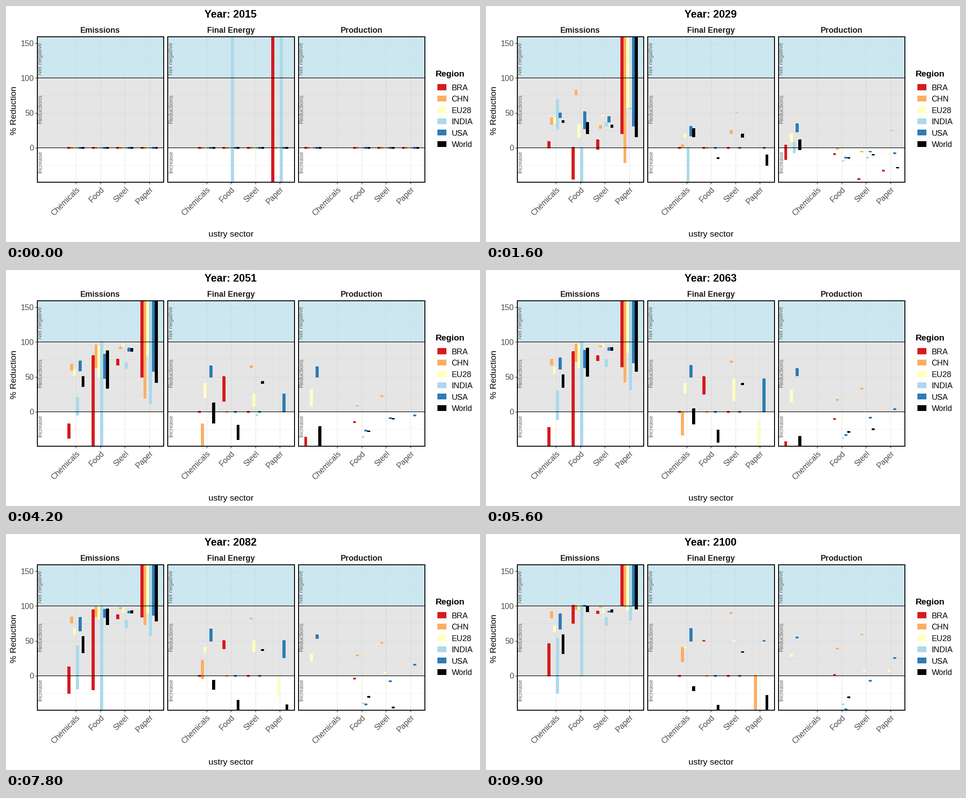
Animation of 1058x529 px, one loop 10000 ms. Source, as a matplotlib script:

```python
import numpy as np
import matplotlib.pyplot as plt
from matplotlib.animation import FuncAnimation
from matplotlib.patches import Rectangle

W, H, DPI = 1058, 529, 64
PT = 72 / DPI                       # points per pixel
FRAMES, INTERVAL = 100, 100
LEAD = 16                           # frames of the straight run from the start
BEND = 0.6                          # below 1: fast change first, slow later

TOP, BOTTOM = 69, 394.5
PANEL_W, PANEL_STEP, PANEL_X = 282.4, 291.6, 69.5
SLOT, DODGE = 54.5, 6.36
CAP, EDGE = 3.8, 0.2

PANELS = ["Emissions", "Final Energy", "Production"]
SECTORS = ["Chemicals", "Food", "Steel", "Paper"]
COLORS = {"BRA": "#D7191C", "CHN": "#FDAE61", "EU28": "#FFFFBF",
          "INDIA": "#ABD9E9", "USA": "#2C7BB6", "World": "#000000"}

plt.rcParams["font.family"] = "Liberation Sans"
fig = plt.figure(figsize=(W / DPI, H / DPI), dpi=DPI, facecolor="white")
ax = fig.add_axes([0, 0, 1, 1])
ax.set_xlim(0, W)
ax.set_ylim(H, 0)
ax.axis("off")


def y_of(value):
    return 317.8 - 1.565 * value


def panel_x(panel):
    return PANEL_X + PANEL_STEP * PANELS.index(panel)


def slot_x(panel, slot):
    return panel_x(panel) + 86.6 + SLOT * slot


def line(x0, y0, x1, y1, width, color, z, **style):
    ax.plot([x0, x1], [y0, y1], color=color, lw=width * PT, zorder=z,
            solid_capstyle="butt", **style)


def rect(x, y, w, h, z, **style):
    return ax.add_patch(Rectangle((x, y), w, h, zorder=z, **style))


def label(x, y, text, size, color="black", **style):
    style = {"ha": "center", "va": "baseline", "rotation_mode": "anchor", **style}
    return ax.text(x, y, text, fontsize=size * PT, color=color, zorder=9, **style)


def draw_panel(panel):
    x = panel_x(panel)
    right = x + PANEL_W
    for v in (-25, 25, 75, 125):
        line(x, y_of(v), right, y_of(v), 0.8, "#EBEBEB", 1)
    for v in (50, 150):
        line(x, y_of(v), right, y_of(v), 1.4, "#EBEBEB", 1)
    for i, sector in enumerate(SECTORS):
        sx = slot_x(panel, i)
        line(sx, TOP, sx, BOTTOM, 1.4, "#EBEBEB", 1)
        line(sx, BOTTOM, sx, BOTTOM + 4.5, 1.4, "#333333", 1)
        label(sx + 9.3, 412, sector, 17.7, "#4D4D4D", ha="right", rotation=45)
    rect(x, TOP, PANEL_W, y_of(100) - TOP, 2, fc="#ADD8E6", alpha=0.6, lw=0)
    rect(x, y_of(100), PANEL_W, y_of(0) - y_of(100), 2, fc="#CCCCCC", alpha=0.5, lw=0)
    for v in (0, 100):
        line(x, y_of(v), right, y_of(v), 1.3, "black", 6, snap=False)
    for y, text in ((118.5, "Net negative"), (230, "Reductions"), (348.5, "Increase")):
        label(x + 10.5, y, text, 13, "#666666", rotation=90)
    rect(x, TOP, PANEL_W, BOTTOM - TOP, 7, fc="none", ec="black", lw=2 * PT)
    label(x + PANEL_W / 2 - 0.5, 60, panel, 17.7, "#1A1A1A", weight="bold")


def path(frame, points, start=0):
    """Run from start to the first point, then ease through the others."""
    points = np.atleast_1d(points)
    if frame < LEAD:
        return start + (points[0] - start) * frame / LEAD
    u = ((frame - LEAD) / (FRAMES - 1 - LEAD)) ** BEND
    return np.interp(u, np.linspace(0, 1, len(points)), points)


class Bar:
    """A box hanging from its high end, which has a thick line on top."""

    def __init__(self, panel, slot, region, high=0, span=0, start=0):
        self.high, self.span, self.start = high, span, start
        offset = (list(COLORS).index(region) - 3) * DODGE
        x = slot_x(panel, slot) + offset
        style = {"fc": COLORS[region], "lw": 0}
        self.box = rect(x - EDGE, 0, DODGE + 2 * EDGE, 1, 4, **style)
        self.cap = rect(x + EDGE, 0, DODGE - 2 * EDGE, CAP, 4, **style)
        clip = Rectangle((panel_x(panel), TOP), PANEL_W, BOTTOM - TOP,
                         transform=ax.transData)
        for part in (self.box, self.cap):
            part.set_clip_path(clip)

    def pose(self, frame):
        high = path(frame, self.high, self.start)
        low = high - path(frame, self.span, 2 * self.start)
        top, bottom = y_of(high), y_of(low)
        self.box.set_y(top - CAP / 4)
        self.box.set_height(bottom - top + CAP / 2)
        self.cap.set_y(top - CAP / 2)


bars = []


def group(panel, slot, **moves):
    """moves: region=(high points, span points, start); the rest stay at zero."""
    for region in COLORS:
        bars.append(Bar(panel, slot, region, *moves.get(region, ())))


def flat(*points):
    return (points,)


OVER = 200                          # beyond the upper edge
COLLAPSE = (-400, 0, 400)           # fills the panel, then falls out of it

group("Emissions", 0,
      BRA=((8, -12, -24, 45), (8, 20, 45)), CHN=((42, 68, 91), 8),
      EU28=((43, 60, 71), 8), INDIA=((68, 20, 53), (41, 25, 78)),
      USA=((49, 72, 88), (6, 21)), World=((38, 50, 58), (2, 26)))
group("Emissions", 1,
      BRA=((0, 80, 100), (45, 300, 25)), CHN=((82, 95, 100), (6, 32, 5)),
      EU28=((33, 94, 100), (18, 44, 4)), INDIA=((0, 100, 100), (60, 300, 100)),
      USA=((51, 82, 100), (24, 34, 0)), World=((36, 87, 99), (16, 53, 7)))
group("Emissions", 2,
      BRA=((11, 75, 92), (13, 3)), CHN=((31, 92, 99), (3, 0)),
      EU28=((46, 97, 95), (0, 5)), INDIA=((35, 70, 83), (4, 11)),
      USA=((44, 91, 92), (7, 1)), World=((32, 90, 94), 3))
group("Emissions", 3,
      BRA=(OVER, (180, 150, 100)), CHN=(OVER, (221, 180, 101)),
      EU28=(OVER, (142, 119, 106)), INDIA=((56, 300, OVER), (0, 288, 120)),
      USA=(OVER, (169, 142, 100)), World=(OVER, (184, 158, 104)))

group("Final Energy", 0,
      CHN=((4, -18, 40), (3, 37, 20)), EU28=((19, 40, 40), (3, 20, 0)),
      INDIA=((0, -200), 60), USA=((30, 65, 67), (13, 17)),
      World=((27, 12, -16), (11, 28, 5)))
group("Final Energy", 1,
      BRA=((0, 50, 50), (0, 35, 0)), INDIA=COLLAPSE,
      World=((-15, -20, -43), (0, 20, 10)))
group("Final Energy", 2,
      CHN=((24, 65, 90), (4, 0)), EU28=((0, 0, 50, 50), (0, 0, 33, 0)),
      INDIA=flat(50, -5, -200), World=((19, 43, 34), (4, 0)))
group("Final Energy", 3,
      BRA=COLLAPSE, CHN=((-80, -300, 0), 60),
      EU28=((-80, -200, 0, 0), (60, 60, 60, 0)), INDIA=COLLAPSE,
      USA=((0, 0, 50, 50), (0, 0, 50, 0)), World=((-11, -70, -29), (14, 40)))

group("Production", -1,
      BRA=((3, -37, -60), 20), CHN=flat(-80),
      EU28=((20, 31, 30), (11, 23, 2)), INDIA=((7, -200), 14),
      USA=((34, 64, 55), (11, 14, 0)), World=((11, -22, -70), (14, 40)))
group("Production", 1,
      BRA=flat(-9, -15, 1.5), CHN=flat(-1.5, 8.5, 39), EU28=flat(-7, -18),
      INDIA=flat(-19, -36, -41), USA=flat(-14, -27, -48),
      World=flat(-14.5, -28, -31))
group("Production", 2,
      BRA=flat(-45, -200), CHN=flat(-5.5, 22.5, 59), EU28=flat(-5.5, -2.5, 7.5),
      INDIA=flat(-14, -100), USA=flat(-5.5, -9, -7), World=flat(-10, -10, -62))
group("Production", 3,
      BRA=flat(-32.5, -120), CHN=flat(-80), EU28=flat(-9, -22, 7),
      INDIA=flat(25, -300), USA=flat(-8, -5, 25.5), World=flat(-28.5, -150))

for name in PANELS:
    draw_panel(name)

for v in (0, 50, 100, 150):
    line(PANEL_X - 5, y_of(v), PANEL_X, y_of(v), 1.4, "#333333", 1)
    label(62, y_of(v) + 6.5, str(v), 17.7, "#4D4D4D", ha="right")

label(23, 234, "% Reduction", 19.2, rotation=90)
label(502, 517, "ustry sector", 19.4)

label(959, 158, "Region", 19.2, ha="left", weight="bold")
for i, (region, color) in enumerate(COLORS.items()):
    cy = 182 + 25.45 * i
    rect(962.6, cy - 6.6, 20.4, 13.2, 4, fc=color, lw=0)
    label(994.5, cy + 7, region, 17.7, ha="left")

title = label(501.5, 26, "", 23.5, weight="bold")


def update(frame):
    title.set_text(f"Year: {round(2015 + 85 * frame / (FRAMES - 1))}")
    for bar in bars:
        bar.pose(frame)
    return [title]


anim = FuncAnimation(fig, update, frames=FRAMES, interval=INTERVAL,
                     init_func=lambda: update(0), repeat=True, repeat_delay=0)
plt.show()
```
